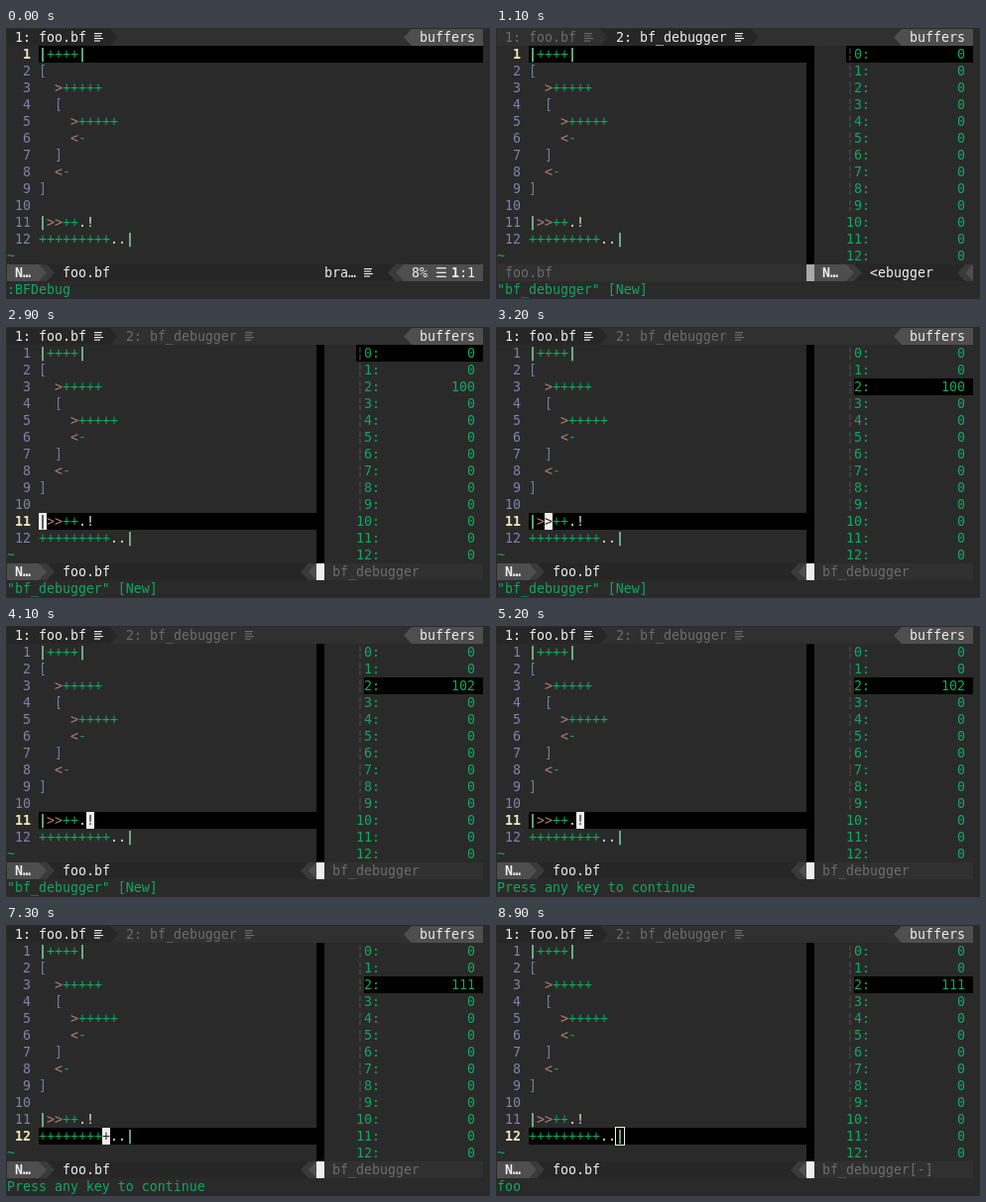
Recreate the animation shown at these times as an HTML page. Size 488 by 274 pixels, loop 9200 ms.

```html
<!DOCTYPE html>
<html lang="en">
<head>
<meta charset="utf-8">
<title>Debugger session</title>
<style>
html, body { margin: 0; width: 100%; height: 100%; overflow: hidden; background: #2a2a2a; }
svg { display: block; }
text { font: 13.288px "DejaVu Sans Mono", "DejaVu Sans", monospace; white-space: pre; }
.b { font-weight: bold; }
</style>
</head>
<body>
<svg id="stage" width="488" height="274" viewBox="0 0 488 274"></svg>
<script>
const LOOP = 9200, CW = 8, CH = 17;
const BG = '#2a2a2a', DARK = '#262626', FILL = '#303030', MID = '#3a3a3a', BOX = '#4e4e4e';
const WHITE = '#eeeeee', GRAY = '#6c6c6c', GREEN = '#10a860';

const code = ['|++++|', '[', '  >+++++', '  [', '    >+++++', '    <-', '  ]', '  <-', ']',
  '', '|>>++.!', '+++++++++..|'];
const tint = { '|': '#87d7a7', '+': GREEN, '-': GREEN, '>': '#b08070', '<': '#b08070',
  '[': '#6c7f9f', ']': '#6c7f9f', '.': '#e4e4d4', '!': '#e4e4d4' };

// Cursor positions: time, row, column; row 0 hides it
const walk = [[0, 0, 0], [300, 15, 8], [700, 0, 0]];
const run = (row, col, times) => times.forEach((t, i) => walk.push([t, row, col + i]));
run(1, 4, [1300, 1500, 1700, 1900, 2200, 2400]);
run(11, 4, [2900, 3000, 3200, 3400, 3600, 3900, 4100]);
walk.push([4200, 15, 25], [4800, 0, 0], [5200, 11, 10]);
run(12, 4, [5400, 5700, 5900, 6100, 6400, 6600, 6800, 7000, 7300, 7500, 7700, 7900]);
walk.push([8500, 0, 0], [8900, 12, 15]);

const marks = [...new Set([...walk.map(w => w[0]), 800, 1100, 1200, 2600])].sort((a, b) => a - b);

const X = c => 1 + CW * c, Y = r => 1 + CH * r;
const esc = s => s.replace(/&/g, '&amp;').replace(/</g, '&lt;');
const rect = (x, y, w, h, f) => `<rect x="${x}" y="${y}" width="${w}" height="${h}" fill="${f}"/>`;
const fill = (r, c, n, f) => rect(X(c), Y(r), n * CW, CH, f);
const text = (r, c, s, f, bold) =>
  `<text x="${X(c)}" y="${Y(r) + 13}" fill="${f}"${bold ? ' class="b"' : ''}>${esc(s)}</text>`;
const icon = (r, c, f) => [8, 7, 9, 6].map((w, i) => rect(X(c), Y(r) + 4 + i * 2.5, w, 1.1, f)).join('');

// Powerline arrow; dir 1 points right, -1 points left
function arrow(r, c, dir, f, back) {
  const a = X(dir > 0 ? c : c + 1), y = Y(r);
  return fill(r, c, 1, back) +
    `<path d="M${a} ${y}l${dir * CW} ${CH / 2}l${-dir * CW} ${CH / 2}z" fill="${f}"/>`;
}

function tab(c, n, s, on) {
  const f = on ? WHITE : GRAY;
  return fill(0, c, n, on ? DARK : FILL) + text(0, c + 1, s, f) + icon(0, c + n - 2, f);
}

function tabs(t) {
  const two = t >= 800, first = !two || t >= 1200;
  let s = fill(0, 0, 60, FILL) + tab(0, 13, '1: foo.bf', first);
  if (two) s += tab(14, 18, '2: bf_debugger', !first);
  s += arrow(0, 13, 1, first ? DARK : FILL, two && !first ? DARK : FILL);
  if (two && !first) s += arrow(0, 32, 1, DARK, FILL);
  return s + arrow(0, 50, -1, BOX, FILL) + fill(0, 51, 9, BOX) + text(0, 52, 'buffers', WHITE);
}

const activeBar = (c, n, name) => fill(14, c, n, DARK) + fill(14, c, 4, BOX) +
  text(14, c + 1, 'N…', WHITE, true) + arrow(14, c + 4, 1, BOX, MID) +
  arrow(14, c + 5, 1, MID, DARK) + text(14, c + 7, name, WHITE);
const endArrows = c => arrow(14, c, -1, MID, DARK) + arrow(14, c + 1, -1, BOX, MID);
const idleBar = (c, n, name) => fill(14, c, n, FILL) + text(14, c + 1, name, GRAY);

function statusBar(t) {
  if (t < 1100) {
    return activeBar(0, 60, 'foo.bf') + text(14, 40, 'bra…', WHITE) + icon(14, 45, WHITE) +
      endArrows(48) + fill(14, 50, 10, BOX) + text(14, 51, '8%', WHITE) +
      text(14, 54, '☰', WHITE) + text(14, 56, '1', WHITE, true) + text(14, 57, ':1', WHITE);
  }
  if (t < 1200) {
    return idleBar(0, 39, 'foo.bf') + fill(14, 39, 1, '#aaaaaa') +
      activeBar(40, 20, '<ebugger').replace(/x="377"/, 'x="377"') + endArrows(58);
  }
  return activeBar(0, 39, 'foo.bf') + endArrows(37) + fill(14, 39, 1, WHITE) +
    idleBar(40, 20, t >= 7900 ? 'bf_debugger[-]' : 'bf_debugger');
}

function source(t) {
  const now = t < 2900 ? 1 : t < 5400 ? 11 : 12;
  let s = fill(now, 4, t < 1100 ? 56 : 35, '#000');
  code.forEach((line, i) => {
    const r = i + 1, on = r === now;
    s += text(r, 1, String(r).padStart(2), on ? '#eeeac0' : '#8080b0', on);
    for (const m of line.matchAll(/([^ ])\1*/g))
      s += text(r, 4 + m.index, m[0], tint[m[1]], m[1] === '|');
  });
  return s + text(13, 0, '~', GREEN);
}

function cells(t) {
  const past = (row, lo, hi) =>
    walk.filter(w => w[0] <= t && w[1] === row && w[2] >= lo && w[2] <= hi).length;
  const mem = Array(13).fill(0);
  if (t < 2600) mem[0] = past(1, 5, 8);
  else mem[2] = 100 + past(11, 7, 8) + past(12, 4, 12);
  const at = t < 3000 ? 0 : t < 3200 ? 1 : 2;
  let s = rect(X(39), Y(1), CW, 13 * CH, '#000');
  s += at ? fill(at + 1, 45, 15, '#000') : fill(1, 44, 16, '#000');
  mem.forEach((v, i) => {
    const val = String(v);
    if (i < 10) s += text(i + 1, 44, '¦', BOX);
    s += text(i + 1, 44, String(i).padStart(2) + ':', GREEN) +
      text(i + 1, 59 - val.length, val, GREEN);
  });
  return s;
}

function message(t) {
  if (t < 700) return ':BFDebug';
  if (t < 4200) return '"bf_debugger" [New]';
  return t < 7900 ? 'Press any key to continue' : 'foo';
}

function cursor(t) {
  const [, r, c] = walk.filter(w => w[0] <= t).pop();
  if (!r) return '';
  if (t >= 8900)
    return `<rect x="${X(c) - .5}" y="${Y(r) - .5}" width="9" height="18" fill="none" stroke="${WHITE}"/>`;
  const ch = r < 13 ? code[r - 1][c - 4] : '';
  return fill(r, c, 1, WHITE) + (ch ? text(r, c, ch, BG, ch === '|') : '');
}

const stage = document.getElementById('stage');
let shown = -1;

function draw(time) {
  const t = marks.filter(m => m <= time % LOOP).pop();
  if (t === shown) return;
  shown = t;
  stage.innerHTML = rect(0, 0, 488, 274, BG) + tabs(t) + source(t) +
    (t >= 1100 ? cells(t) : '') + statusBar(t) + text(15, 0, message(t), GREEN) + cursor(t);
}

const start = performance.now();
function tick() {
  draw(performance.now() - start);
  requestAnimationFrame(tick);
}
tick();
</script>
</body>
</html>
```
